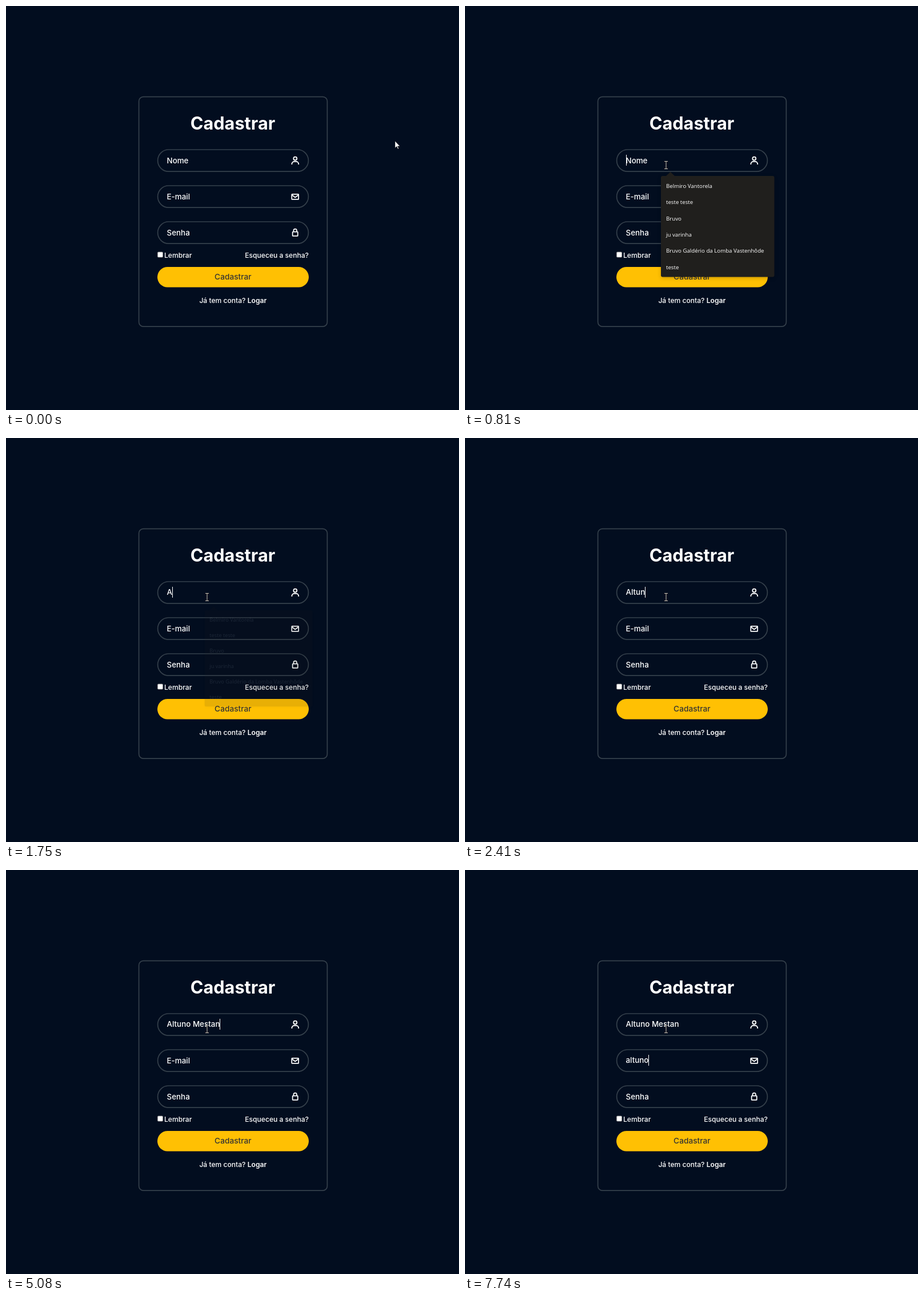
Animation of 793x706 px, one loop 8000 ms. Source, as an HTML page:

```html
<!DOCTYPE html>
<html lang="pt">
<head>
<meta charset="utf-8">
<title>Cadastrar</title>
<style>
  html, body { margin: 0; width: 100%; height: 100%; overflow: hidden; background: #020d1f; }
  svg { display: block; width: 793px; height: 706px; }
  text { font-family: Inter, "Open Sans", sans-serif; font-optical-sizing: none; font-weight: 500; fill: #fff; white-space: pre; }
  .title { font-size: 30.7px; font-weight: 700; text-anchor: middle; }
  .field { font-size: 13.4px; }
  .small { font-size: 12.1px; }
  .bold { font-weight: 600; }
  .button { font-size: 13.7px; fill: #333; text-anchor: middle; }
  .box { fill: none; stroke: #35404b; stroke-width: 1.7; }
  .icon { fill: none; stroke: #fff; stroke-width: 2.5; stroke-linejoin: round; }
  #popup { transform-origin: 442px 386px; }
  #popup text { font-family: "Open Sans", "Noto Sans", sans-serif; font-size: 9.7px; font-weight: 400; }
  #panel { fill: #201f1d; filter: drop-shadow(0 2px 3px rgba(0, 0, 0, .2)); }
  #beam { fill: none; stroke: #d0d0d0; mix-blend-mode: difference; }
</style>
</head>
<body>
<svg viewBox="0 0 793 706">
  <rect class="box" x="232.6" y="158.6" width="329.8" height="401.6" rx="8"/>
  <text class="title" x="397" y="215.5">Cadastrar</text>

  <g id="fields"></g>
  <g class="icon" transform="translate(497.4 261.4) scale(.74)">
    <circle cx="12" cy="7" r="4"/>
    <path d="M4 21v-1a6 6 0 0 1 6-6h4a6 6 0 0 1 6 6v1"/>
  </g>
  <g class="icon" transform="translate(497.8 325) scale(.7)">
    <rect x="3.500" y="5.500" width="17" height="13" rx="1"/>
    <path d="M4 7.500l8 6 8-6"/>
  </g>
  <g class="icon" transform="translate(497.8 387.6) scale(.7)">
    <rect x="5.500" y="10" width="13" height="10.500" rx="1"/>
    <path d="M8 10V7a4 4 0 0 1 8 0v3"/>
  </g>
  <rect id="caret" width="1" height="19" fill="#fff"/>

  <rect x="265.4" y="429.9" width="9.2" height="9.2" rx="1.5" fill="#fff" stroke="#858585" stroke-width=".8"/>
  <text class="small" x="277" y="439.6">Lembrar</text>
  <text class="small" x="530" y="439.6" text-anchor="end">Esqueceu a senha?</text>
  <rect x="265" y="456" width="265" height="35.5" rx="17.75" fill="#ffc003"/>
  <text class="button" x="397.3" y="478.4">Cadastrar</text>
  <text class="small" x="397.3" y="519.4" text-anchor="middle">Já tem conta? <tspan class="bold">Logar</tspan></text>

  <g id="popup">
    <g id="panel">
      <rect x="343" y="297" width="198.5" height="176.5" rx="3"/>
      <path d="M352 297l7.500-7 7.500 7z"/>
    </g>
  </g>

  <path id="arrow" fill="#fff" stroke="#000" stroke-width=".5" d="M0 0V12L3 9.500 5 14 6.500 13 4.500 9H8.500Z"/>
  <path id="beam" d="M-3-6.500H3M0-6V6M-3 6.500H3"/>
</svg>
<script>
const LOOP = 8000, BLINK = 530, ROW = 63;
const OPEN = 810, CLOSE = 1600, NEXT_FIELD = 5410;
const $ = id => document.getElementById(id);

function add(parent, tag, attrs, label = '') {
  const node = document.createElementNS('http://www.w3.org/2000/svg', tag);
  for (const key in attrs) node.setAttribute(key, attrs[key]);
  node.textContent = label;
  return $(parent).appendChild(node);
}

const hints = ['Nome', 'E-mail', 'Senha'];
const fields = hints.map((hint, i) => {
  add('fields', 'rect', { class: 'box', x: 265.6, y: 251 + i * ROW, width: 263.8, height: 38.2, rx: 19.1 });
  return add('fields', 'text', { class: 'field', x: 281.5 }, hint);
});

const suggestions = ['Belmiro Vantorela', 'teste teste', 'Bruvo', 'ju varinha',
  'Bruvo Galdério da Lomba Vastenhôde', 'teste'];
suggestions.forEach((label, i) => add('popup', 'text', { x: 352, y: 317.8 + i * 28.4 }, label));

// Each burst of keys: letters, start, time between keys
const burst = (letters, from, gap) => [...letters].map((letter, i) => ({ letter, time: from + i * gap }));
const keys = [
  [burst('A', 1620, 0), burst('ltuno', 1880, 150), burst(' M', 2740, 540), burst('estan', 4280, 200)].flat(),
  [burst('al', 6070, 200), burst('tuno', 6870, 290)].flat(),
  []
];
const caretResets = [OPEN, NEXT_FIELD, ...keys.flat().map(key => key.time)];

function drawFields(t) {
  const focus = t < NEXT_FIELD ? 0 : 1;
  fields.forEach((node, i) => {
    const typed = keys[i].filter(key => key.time <= t).map(key => key.letter).join('');
    const label = typed || hints[i];
    if (node.textContent !== label) node.textContent = label;
    node.setAttribute('y', (typed ? 274 : 275) + i * ROW);
    if (i === focus) {
      const width = typed ? node.getComputedTextLength() : 0;
      $('caret').setAttribute('x', 282 + Math.floor(width));
      $('caret').setAttribute('y', 260 + i * ROW);
    }
  });
  const idle = t - Math.max(...caretResets.filter(time => time <= t));
  $('caret').style.opacity = t >= OPEN && idle % (2 * BLINK) < BLINK ? 1 : 0;
}

function drawPopup(t) {
  const fade = Math.min(1, Math.max(0, (t - CLOSE) / 220));
  $('popup').style.opacity = t < OPEN ? 0 : (1 - fade) ** 2;
  $('popup').style.transform = `scale(${1 - .07 * fade})`;
}

const curve = (k, a, b, c) => (1 - k) ** 2 * a + 2 * k * (1 - k) * b + k * k * c;
const inside = (x, y, l, t, r, b) => x > l && x < r && y > t && y < b;

function drawPointer(t) {
  const step = Math.min(11, Math.floor((t + 5) / 67));
  const k = (1 - Math.cos(Math.PI * step / 11)) / 2;
  const x = curve(k, 681, 520, 352), y = curve(k, 236, 50, 278);
  const overText = inside(x, y, 323, 182, 471, 228) || inside(x, y, 265, 250, 530, 290);
  for (const id of ['arrow', 'beam']) {
    $(id).setAttribute('transform', `translate(${x} ${y})`);
    $(id).style.display = (id === 'beam') === overText ? '' : 'none';
  }
}

const start = performance.now();
function draw() {
  const t = (performance.now() - start) % LOOP;
  drawFields(t);
  drawPopup(t);
  drawPointer(t);
  requestAnimationFrame(draw);
}
draw();
</script>
</body>
</html>
```
